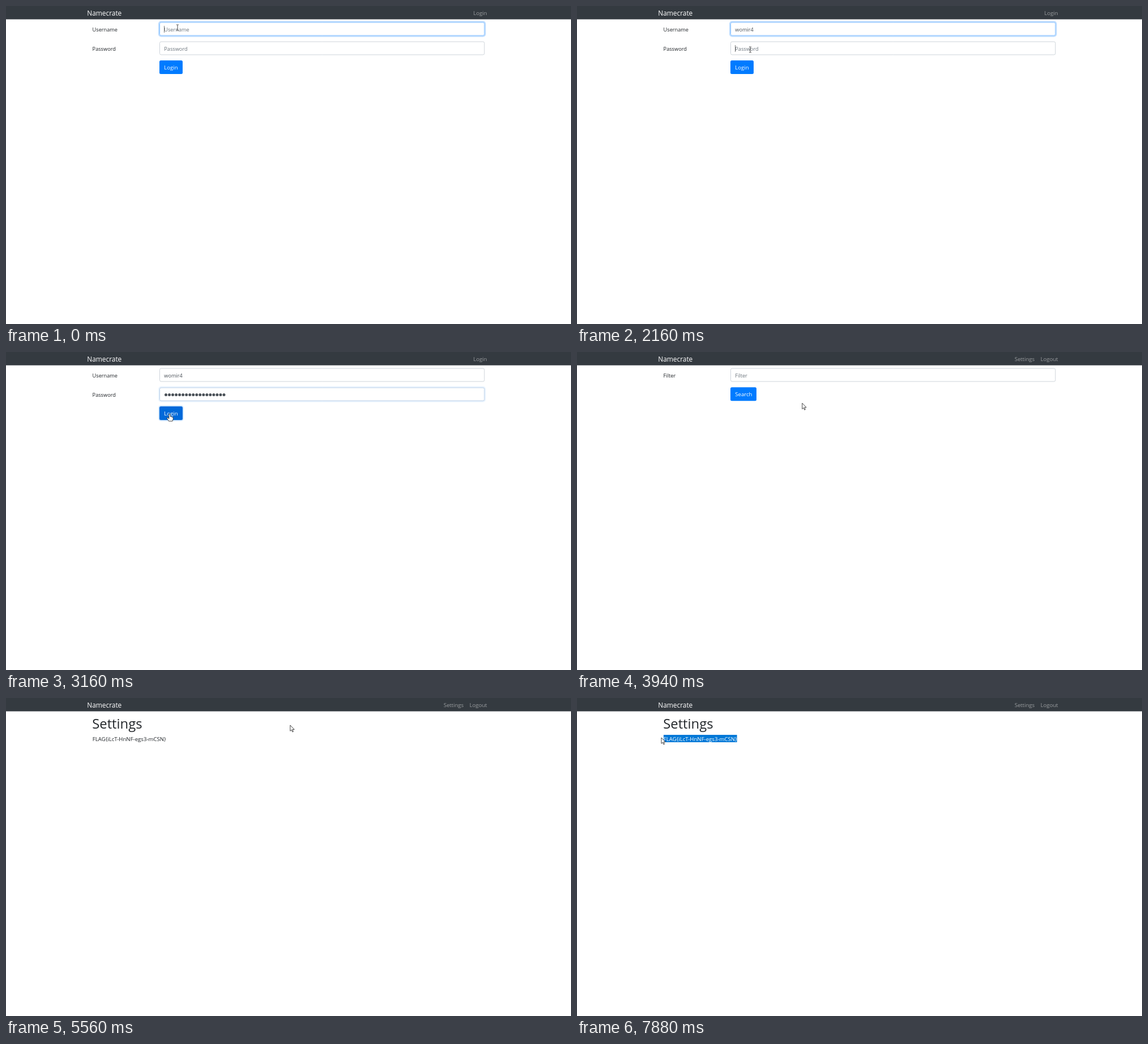
Write an HTML page with a canvas that moves like this. It is 998 by 561 pixels and loops after 7900 ms.

```html
<!DOCTYPE html>
<html lang="en">
<head>
<meta charset="utf-8">
<title>Login and settings</title>
<style>
  html, body { margin: 0; width: 100%; height: 100%; overflow: hidden; background: #fff; }
  canvas { display: block; }
</style>
</head>
<body>
<canvas id="stage" width="998" height="561"></canvas>
<script>
const ctx = document.getElementById('stage').getContext('2d');
const LOOP = 7900, FONT = '"Open Sans", "Noto Sans", sans-serif';
const INK = '#212529', HINT = '#6c757d', MUTED = '#9a9d9f';
const USER = 'womir4', FLAG = 'FLAG{iLcT-HnNF-egs3-mCSN}';
const KEYS = [450, 600, 750, 880, 1000, 1450];
const PASTE = 2520, TO_PASSWORD = 2140, PRESS = 3060, FILTER_PAGE = 3500, SETTINGS_PAGE = 5000;

// Pointer moves: start, end, target x, target y
const MOVES = [
  [1650, 2080, 306, 77],
  [2650, 3000, 289, 109],
  [3700, 4500, 789, 22.5],
  [5150, 5900, 287, 67],
  [6173, 6573, 149, 70]
];

const ramp = (t, a, b) => Math.min(1, Math.max(0, (t - a) / (b - a)));
const ease = u => u * u * (3 - 2 * u);
const mix = (a, b, u) => `rgb(${a.map((v, i) => Math.round(v + (b[i] - v) * u))})`;

function pointer(t) {
  let x = 303, y = 38;
  for (const [a, b, tx, ty] of MOVES) {
    const u = ease(ramp(t, a, b));
    x += (tx - x) * u;
    y += (ty - y) * u;
  }
  return [x, y];
}

function text(s, x, y, size = 9.2, color = INK) {
  ctx.font = `${size}px ${FONT}`;
  ctx.fillStyle = color;
  ctx.fillText(s, x, y);
}

function box(x, y, w, h, r) {
  ctx.beginPath();
  ctx.roundRect(x, y, w, h, r);
}

function ring(x, y, w, h, glow) {
  if (!glow) return;
  box(x - 1, y - 1, w + 2, h + 2, 4);
  ctx.lineWidth = 2;
  ctx.strokeStyle = `rgba(0,123,255,${0.27 * glow})`;
  ctx.stroke();
}

function field(y, focus = 0) {
  ring(271, y, 574.5, 24, focus);
  box(271.5, y + 0.5, 573.5, 23, 2.5);
  ctx.fillStyle = '#fff';
  ctx.fill();
  ctx.lineWidth = 1;
  ctx.strokeStyle = mix([206, 212, 218], [128, 189, 255], focus);
  ctx.stroke();
}

function button(label, y, w, hover = 0, focus = 0) {
  ring(271, y, w, 24, focus);
  box(271, y, w, 24, 2.5);
  ctx.fillStyle = mix([0, 123, 255], [0, 105, 217], hover);
  ctx.fill();
  text(label, 279.3, y + 16, 9.6, '#fff');
}

function caret(x, y, since) {
  if (since % 1060 > 530) return;
  ctx.fillStyle = '#555';
  ctx.fillRect(Math.round(x), y, 0.8, 12);
}

function navbar(...links) {
  ctx.fillStyle = '#343a40';
  ctx.fillRect(0, 0, 998, 23.5);
  text('Namecrate', 143.2, 16.8, 11.9, '#fff');
  ctx.textAlign = 'right';
  links.forEach((s, i) => text(s, i ? 808.3 : 849.7, 15.8, 9.55, MUTED));
  ctx.textAlign = 'left';
}

function loginPage(t) {
  const typed = USER.slice(0, KEYS.filter(k => t >= k).length);
  const toPass = ramp(t, TO_PASSWORD + 20, TO_PASSWORD + 170);
  const pressed = ramp(t, PRESS, PRESS + 150);

  navbar('Login');
  text('Username', 152.6, 45);
  field(28.5, 1 - toPass);
  text(typed || 'Username', 279.3, 45, 9.2, typed ? '#495057' : HINT);
  if (t < TO_PASSWORD) {
    const last = KEYS.filter(k => t >= k).pop() || 0;
    caret(279.4 + (typed ? ctx.measureText(typed).width : 0), 35, t - last);
  }

  text('Password', 152.6, 78.6);
  field(62.5, toPass * (1 - pressed));
  if (t < PASTE) {
    text('Password', 279.3, 78.6, 9.2, HINT);
  } else {
    ctx.fillStyle = '#495057';
    for (let i = 0; i < 18; i++) {
      ctx.beginPath();
      ctx.arc(282.5 + i * 6.03, 75.6, 2.5, 0, 7);
      ctx.fill();
    }
  }
  if (t >= TO_PASSWORD && t < PRESS)
    caret(t < PASTE ? 279.4 : 389, 69, t - (t < PASTE ? TO_PASSWORD : PASTE));

  button('Login', 96, 41, ramp(t, 2850, 3000), pressed);
}

function filterPage() {
  navbar('Logout', 'Settings');
  text('Filter', 152.6, 45);
  field(28.5);
  text('Filter', 279.3, 45, 9.2, HINT);
  button('Search', 62.3, 46);
}

function settingsPage(t) {
  navbar('Logout', 'Settings');
  text('Settings', 152.3, 54, 23.8);
  text(FLAG, 152.8, 75.6, 9.65);

  // The highlight trails the pointer and snaps to whole letters.
  const x = pointer(t - 70)[0];
  const widthTo = n => ctx.measureText(FLAG.slice(0, n)).width;
  const end = 152.8 + widthTo(FLAG.length);
  if (t < 6173 || x >= end) return;
  let n = 0;
  while (n < FLAG.length && 152.8 + (widthTo(n) + widthTo(n + 1)) / 2 < x) n++;
  const left = 152.8 + widthTo(n);
  ctx.save();
  ctx.beginPath();
  ctx.rect(left, 65, end - left, 13);
  ctx.clip();
  ctx.fillStyle = '#0078d7';
  ctx.fillRect(left, 65, end - left, 13);
  text(FLAG, 152.8, 75.6, 9.65, '#fff');
  ctx.restore();
}

function pointerKind(t, x, y) {
  const within = (l, r, a, b) => x >= l && x <= r && y >= a && y <= b;
  if (t < FILTER_PAGE) {
    if (within(271, 845, 28, 52) || within(271, 845, 62, 86)) return 'beam';
    return within(271, 312, 96, 120) ? 'hand' : 'arrow';
  }
  if (within(767, 855, 0, 24)) return 'hand';
  if (t < SETTINGS_PAGE) {
    if (within(271, 317, 62, 86)) return 'hand';
    return within(271, 845, 28, 52) ? 'beam' : 'arrow';
  }
  return within(153, 290, 62, 80) || within(153, 242, 30, 60) ? 'beam' : 'arrow';
}

const SHAPES = {
  beam: new Path2D('M-2 -5H-.6L0 -4.4L.6 -5H2M0 -4.4V4.4M-2 5H-.6L0 4.4L.6 5H2'),
  arrow: new Path2D('M0 0V10.4L2.4 8.2L4 12L5.6 11.3L4 7.6H7.3Z'),
  hand: new Path2D('M-1.2 .8Q0 -.6 1.2 .8V5Q2.4 4.2 3 5.4Q4.2 4.8 4.7 6Q6.2 5.6 6.2 7.2V9.5L5 13H-1.5L-4.4 8.4Q-5 6.6-3.4 6.8L-1.2 8.6Z')
};

function drawPointer(t) {
  const [x, y] = pointer(t), kind = pointerKind(t, x, y);
  ctx.save();
  ctx.translate(x, y);
  ctx.lineWidth = 0.9;
  ctx.strokeStyle = '#333';
  ctx.fillStyle = '#fff';
  if (kind !== 'beam') ctx.fill(SHAPES[kind]);
  ctx.stroke(SHAPES[kind]);
  ctx.restore();
}

function draw(now) {
  const t = now % LOOP;
  ctx.fillStyle = '#fff';
  ctx.fillRect(0, 0, 998, 561);
  if (t < FILTER_PAGE) loginPage(t);
  else if (t < SETTINGS_PAGE) filterPage();
  else settingsPage(t);
  drawPointer(t);
}

const start = performance.now();
function tick() {
  draw(performance.now() - start);
  requestAnimationFrame(tick);
}
tick();
</script>
</body>
</html>
```
